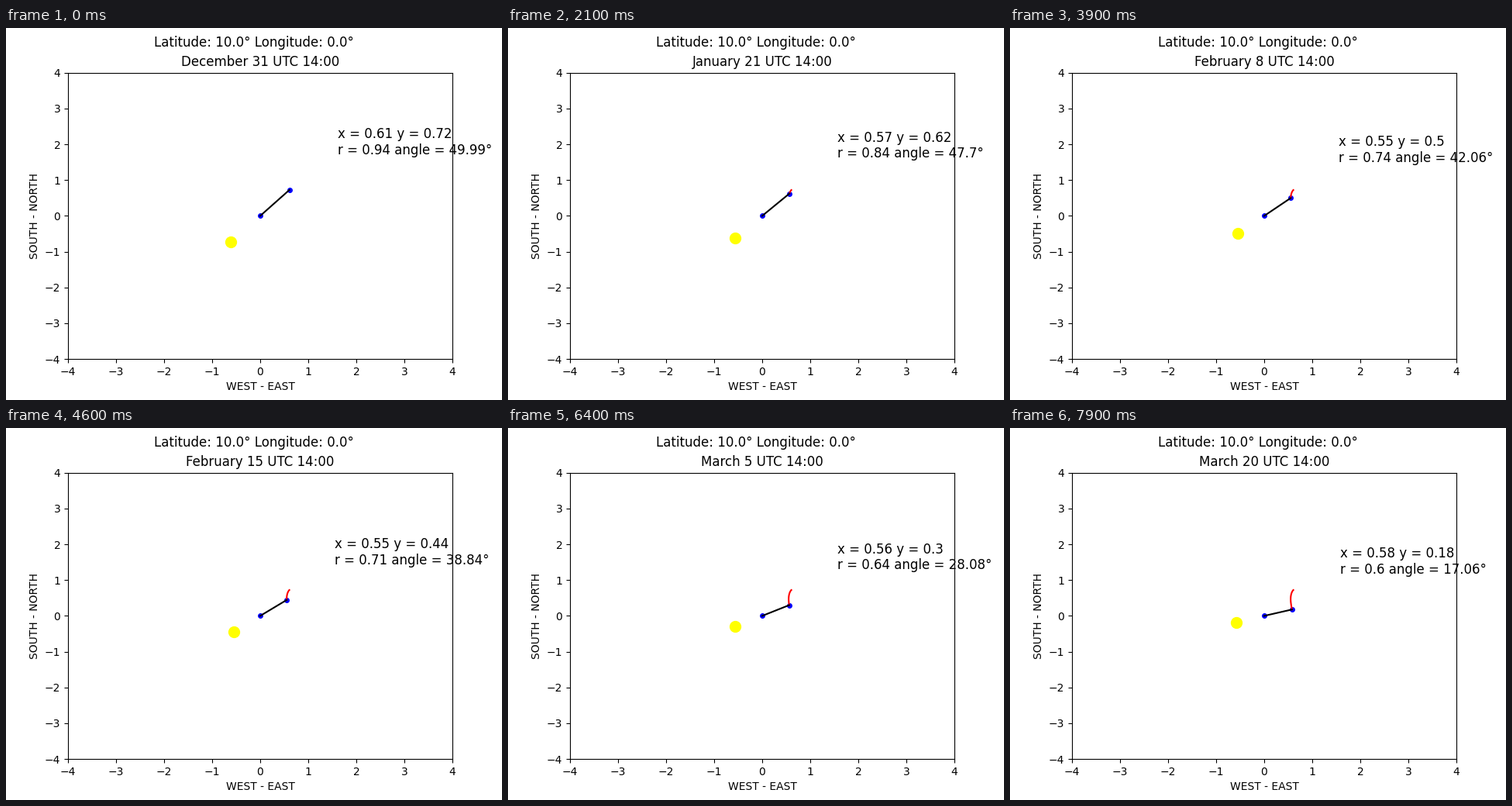
Write a matplotlib script that moves like this. It is 640 px wide and 480 px high and loops after 8 s.

```python
import numpy as np
import matplotlib.pyplot as plt
from matplotlib.animation import FuncAnimation

DAYS = 80
MONTHS = [("December", 1), ("January", 31), ("February", 28), ("March", 31)]

# Shadow of a unit stick at 14:00 UTC: smooth curves through a few days
knots = np.array([0, 8, 21, 39, 53, 64, 79]) / 79
angle_knots = [49.99, 49.61, 47.7, 42.06, 35.06, 28.08, 17.06]
east_knots = [0.6065, 0.5885, 0.5662, 0.551, 0.5537, 0.562, 0.577]

day = np.arange(DAYS) / 79
angle = np.polyval(np.polyfit(knots, angle_knots, 6), day)
east = np.polyval(np.polyfit(knots, east_knots, 4), day)
north = east * np.tan(np.radians(angle))
length = np.hypot(east, north)


def date_label(n):
    if n == 0:
        return "December 31"
    n -= 1
    for month, size in MONTHS[1:]:
        if n < size:
            return f"{month} {n + 1}"
        n -= size


def num(v):
    return str(round(float(v), 2))


fig, ax = plt.subplots(figsize=(6.4, 4.8), dpi=100)
fig.suptitle("Latitude: 10.0° Longitude: 0.0°")
ax.set(xlim=(-4, 4), ylim=(-4, 4), xlabel="WEST - EAST", ylabel="SOUTH - NORTH")
title = ax.set_title("")

sun, = ax.plot([], [], "o", color="yellow", markersize=10)
ends, = ax.plot([], [], "o", color="blue", markersize=4)
trail, = ax.plot([], [], color="red", lw=1.5)
shadow, = ax.plot([], [], color="black", lw=1.5)
note = ax.text(0, 0, "", fontsize=12)


def update(n):
    x, y = east[n], north[n]
    title.set_text(f"{date_label(n)} UTC 14:00")
    sun.set_data([-x], [-y])
    ends.set_data([0, x], [0, y])
    shadow.set_data([0, x], [0, y])
    trail.set_data(east[:n + 1], north[:n + 1])
    note.set_position((x + 1, y + 1))
    note.set_text(f"x = {num(x)} y = {num(y)}\n"
                  f"r = {num(length[n])} angle = {num(angle[n])}°")
    return title, sun, ends, trail, shadow, note


anim = FuncAnimation(fig, update, frames=DAYS, interval=100, repeat=True, repeat_delay=0)
plt.show()
```
